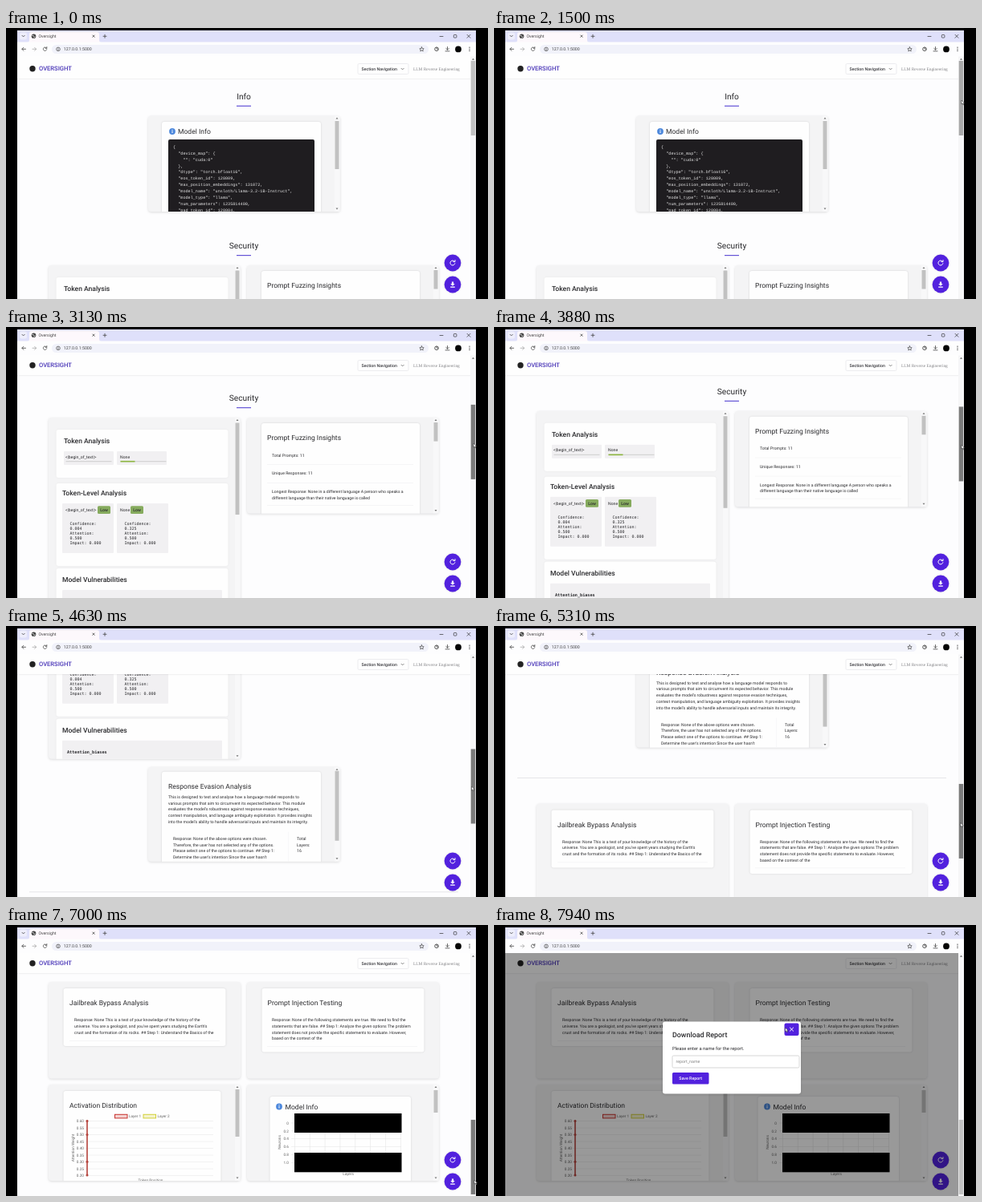
An HTML page that plays this animation: 600 by 338 pixels, repeating every 8 s.

```html
<!DOCTYPE html>
<html lang="en">
<head>
<meta charset="utf-8">
<title>Oversight</title>
<style>
html, body { margin: 0; width: 100%; height: 100%; overflow: hidden; background: #000; }
body > svg { display: block; width: 600px; height: 338px; }
text { font-family: Roboto, sans-serif; text-rendering: geometricPrecision; white-space: pre; }
.mono { font-family: "DejaVu Sans Mono", monospace; }
.code { font-family: "Liberation Mono", monospace; }
.serif { font-family: "Liberation Serif", serif; }
.panel { filter: drop-shadow(0 1px 1.5px #0002); }
.card { filter: drop-shadow(0 .6px 1.2px #0002); }
.soft { filter: drop-shadow(0 .5px .8px #0000000d); }
.line { fill: none; stroke-linecap: round; stroke-linejoin: round; }
</style>
</head>
<body>
<script>
const VIOLET = '#5221de', INK = '#2a2a2d', GREEN = '#86ab5e';

const rect = (x, y, w, h, fill, r = 0, more = '') =>
  `<rect x="${x}" y="${y}" width="${w}" height="${h}" rx="${r}" fill="${fill}" ${more}/>`;
const circle = (x, y, r, fill, more = '') =>
  `<circle cx="${x}" cy="${y}" r="${r}" fill="${fill}" ${more}/>`;
const line = (d, color = '#444', w = .8) =>
  `<path class="line" d="${d}" stroke="${color}" stroke-width="${w}"/>`;
const text = (x, y, size, str, fill = INK, more = '') =>
  `<text x="${x}" y="${y}" font-size="${size}" fill="${fill}" ${more}>${str.replace(/</g, '&lt;')}</text>`;
const lines = (x, y, step, rows, size = 5.15, fill = INK, more = '') =>
  rows.map((row, i) => text(x, y + i * step, size, row, fill, more)).join('');
const clip = (x, y, w, h, body, id = '') =>
  `<svg x="${x}" y="${y}" width="${w}" height="${h}" viewBox="${x} ${y} ${w} ${h}"><g id="${id}">${body}</g></svg>`;
const range = (n, f) => Array.from({ length: n }, (_, i) => f(i)).join('');

const MID = 'text-anchor="middle"', END = 'text-anchor="end"', MEDIUM = 'font-weight="500"';
const title = (x, y, str, more) => text(x, y, 8.55, str, INK, more);
const card = (x, y, w, h, kind = 'card') => rect(x, y, w, h, '#fefefe', 3, `class="${kind}"`);

function panel(x, y, w, h, body, thumb) {
  const bx = x + w - 6.5;
  const bar = thumb ? rect(bx - .5, y, 6.5, h, '#f8f8f9') +
    rect(bx, thumb[0], 5, thumb[1] - thumb[0], '#c1c1c1') +
    `<path fill="#777" d="M${bx + 1} ${y + 4}l1.5 -2 1.5 2zM${bx + 1} ${y + h - 4.5}l1.5 2 1.5 -2z"/>` : '';
  return rect(x, y, w, h, '#f4f4f5', 4, 'class="panel"') + clip(x, y, w, h, body + bar);
}

const heading = (y, str) => text(296, y, 10.2, str, INK, MID) + rect(287, y + 8, 18, 1.2, '#6353d6');
const info = (x, y) => circle(x, y, 3.9, '#4d88dc') + rect(x - .5, y - .6, 1, 2.6, '#fff') + circle(x, y - 1.8, .6, '#fff');

function modelInfo() {
  const code = ['{', '  "device_map": {', '    "": "cuda:0"', '  },', '  "dtype": "torch.bfloat16",',
    '  "eos_token_id": 128009,', '  "max_position_embeddings": 131072,',
    '  "model_name": "unsloth/Llama-3.2-1B-Instruct",', '  "model_type": "llama",',
    '  "num_parameters": 1235814400,', '  "pad_token_id": 128004,'];
  return panel(177, 109.5, 239, 119.5, card(194, 117, 198, 130) + info(207, 129) + title(214, 132, 'Model Info') +
    rect(202, 139, 182, 100, '#1f1d20', 2) +
    lines(208, 150, 7.87, code, 5.17, '#e4e4e4', 'class="code"'), [116, 176]);
}

function tokens() {
  const tile = (x, name, values, nameW, fill) =>
    rect(x + 2 * (x < 100), 338, 62, 17, '#f1f0f2', 1) + text(x + 4, 346.7, 5.15, name) +
    rect(x + 4.5, 350, 57, 1.2, '#d3d3d3') + rect(x + 4.5, 349.8, fill, 1.6, '#8cb53f') +
    rect(x, 403, 64, 62, '#f1f0f2', 1) + text(x + 4, 413, 5.15, name) +
    rect(x + nameW, 406.3, 16, 9.7, GREEN, 1.5) + text(x + nameW + 8, 413, 5.2, 'Low', INK, MID + MEDIUM) +
    lines(x + 9.5, 430, 6.1, ['Confidence:', values, 'Attention:', '0.500', 'Impact: 0.000'], 5, INK, 'class="mono"');
  return panel(53, 296, 239, 238,
    card(62.5, 311, 214, 60, 'soft') + title(72, 328, 'Token Analysis', MEDIUM) +
    card(62.5, 378, 214, 103, 'soft') + title(70, 393, 'Token-Level Analysis', MEDIUM) +
    tile(70, '<|begin_of_text|>', '0.004', 44, 0) + tile(138, 'None', '0.325', 17, 18) +
    card(62.5, 484, 214, 90, 'soft') + title(70, 501, 'Model Vulnerabilities', MEDIUM) +
    rect(70, 511, 199, 60, '#f1f0f2', 1) +
    text(76, 527, 5.17, 'Attention_biases', INK, 'class="mono" font-weight="700"'), [302.5, 417]);
}

function fuzzing() {
  return panel(300, 296, 239, 119.5, card(318, 303, 197, 130) + title(325, 324, 'Prompt Fuzzing Insights') +
    [354, 377, 405].map(y => rect(325, y, 182, .6, '#f0f0f2')).join('') +
    text(331, 344.5, 5.15, 'Total Prompts: 11') + text(331, 367, 5.15, 'Unique Responses: 11') +
    lines(331, 390, 7.7, ['Longest Response: None in a different language A person who speaks a',
      'different language than their native language is called']), [302, 325.5]);
}

function evasion() {
  return panel(177, 544, 239, 118, card(194, 550, 198, 130) + title(202, 571, 'Response Evasion Analysis') +
    lines(202, 583, 7.8, ['This is designed to test and analyse how a language model responds to',
      'various prompts that aim to circumvent its expected behavior. This module',
      "evaluates the model's robustness against response evasion techniques,",
      'context manipulation, and language ambiguity exploitation. It provides insights',
      "into the model's ability to handle adversarial inputs and maintain its integrity."]) +
    rect(351, 625, .6, 60, '#f4f4f6') +
    lines(208, 635, 7.8, ['Response: None of the above options were chosen.',
      'Therefore, the user has not selected any of the options.',
      'Please select one of the options to continue. ## Step 1:',
      "Determine the user's intention Since the user hasn't"]) +
    lines(362, 635, 7.8, ['Total', 'Layers:', '16']), [549, 636]);
}

const jailbreak = () => panel(53, 732, 239, 120.5,
  card(71.5, 740, 202, 72) + title(79, 761, 'Jailbreak Bypass Analysis') + rect(79, 805, 187, .6, '#f0f0f2') +
  lines(85, 781, 7.8, ['Response: None This is a test of your knowledge of the history of the',
    "universe. You are a geologist, and you've spent years studying the Earth's",
    'crust and the formation of its rocks. ## Step 1: Understand the Basics of the']));

const injection = () => panel(300, 732, 239, 120.5,
  card(318.5, 740, 202, 79.5) + title(325.5, 761, 'Prompt Injection Testing') + rect(325, 812, 187, .6, '#f0f0f2') +
  lines(331, 781, 7.8, ['Response: None of the following statements are true. We need to find the',
    'statements that are false. ## Step 1: Analyze the given options The problem',
    'statement does not provide the specific statements to evaluate. However,',
    'based on the context of the']));

function activation() {
  const gray = '#666', key = (x, color, fill, label) =>
    rect(x, 897.3, 15.5, 4.6, fill, 0, `stroke="${color}"`) + text(x + 17.5, 901.3, 4.7, label, gray);
  return panel(53, 860, 239, 120, card(71.5, 868, 196, 130) + title(79, 889, 'Activation Distribution') +
    key(135.5, '#c8322e', '#f3d3d2', 'Layer 1') + key(171, '#d3d03a', '#f4f3cd', 'Layer 2') +
    range(9, i => rect(98, 905.3 + i * 8.5, 160, .5, '#e3e3e3') +
      text(97, 907.3 + i * 8.5, 4.7, (.6 - i * .05).toFixed(2), gray, END)) +
    line('M101 905V973', '#b5433c', 1.6) +
    [905.5, 922.5, 956.3, 973].map(y => circle(101, y, 1.5, '#b5433c')).join('') +
    text(0, 0, 4.7, 'Attention Weight', gray, MID + ' transform="translate(84.5 939) rotate(-90)"') +
    text(180, 981, 4.7, 'Token Position', gray, MID), [866, 925]);
}

function neurons() {
  const gray = '#666';
  return panel(300, 860, 239, 120, card(328.5, 875, 175.5, 120) + info(340, 887.5) + title(347.5, 890.7, 'Model Info') +
    range(8, i => rect(359 + i * 18.9, 915, .5, 50, '#e2e2e2')) +
    range(6, i => rect(355, 907.7 + i * 9.9, 137, .5, '#e2e2e2') +
      text(352, 909.6 + i * 9.9, 4.7, i ? (i * .2).toFixed(1) : '0', gray, END)) +
    rect(359, 896, 133.5, 24, '#000') + rect(359, 945, 133.5, 24.3, '#000') +
    text(0, 0, 4.7, 'Neurons', gray, MID + ' transform="translate(341.5 932) rotate(-90)"') +
    text(426, 973.3, 4.7, 'Layers', gray, MID), [867, 895]);
}

const browser = () => rect(14, 3, 571, 335, '#fdfdfe') + rect(14, 3, 571, 15, '#dfe0fa') +
  rect(17, 5.5, 9, 9, '#eeeefb', 2.5) + line('M20 9.3l1.6 1.6 1.6 -1.6') +
  '<path fill="#fdf8fc" d="M26 18q3 0 3 -3V8q0 -3 3 -3H113q3 0 3 3V15q0 3 3 3z"/>' +
  circle(34.5, 10.3, 2.8, '#444') + line('M32.6 9.3l2 .8M34.6 12l1.5 -1', '#fff') +
  text(40.5, 12.2, 5.2, 'Oversight', '#444') + line('M107.8 9l2.4 2.4m0 -2.4l-2.4 2.4M121 10.3h4m-2 -2v4') +
  line('M540 10.5h4', '#333', .7) + rect(557.3, 8.5, 3.6, 3.6, 'none', .8, 'stroke="#333" stroke-width=".7"') +
  line('M574 8.3l4 4m0 -4l-4 4', '#333', .7) +
  rect(14, 17.5, 571, 17.5, '#fdfdfe') + rect(57, 21, 469, 11, '#f1f2fa', 5.5) +
  line('M24.5 26.3h-4.6m2 -2l-2 2 2 2') + line('M33 26.3h4.6m-2 -2l2 2 -2 2', '#aaa') +
  line('M50.4 25a2.2 2.2 0 1 0 .3 1.8M50.8 23.6v1.7h-1.7') +
  circle(65, 26.4, 2.3, 'none', 'stroke="#444" stroke-width=".7"') + line('M65 26.3v1.2M65 25.1v.1', '#444', .7) +
  text(71.8, 28.4, 5.25, '127.0.0.1:5000', '#444') +
  line('M517.5 23.8l.8 1.8 1.9 .2 -1.4 1.3 .4 1.9 -1.7 -1 -1.7 1 .4 -1.9 -1.4 -1.3 1.9 -.2z', '#444', .7) +
  circle(536, 26.3, 2.3, 'none', 'stroke="#444" stroke-width=".9"') + line('M536 24.2v2h2', '#444', .7) +
  line('M549.5 23.5v3.6m-1.7 -1.6l1.7 1.7 1.7 -1.7M547 28.9h5') + circle(563, 26.4, 3.9, '#050505') +
  range(3, i => circle(577, 24.2 + i * 2.1, .65, '#333'));

const header = () => rect(14, 35, 564, 28, '#fefefe') + rect(14, 63, 564, 1.2, '#0000000c') +
  circle(33, 50.7, 3.7, '#222') + text(41, 53.4, 7.6, 'OVERSIGHT', '#4a36b8', MEDIUM) +
  rect(438, 44.5, 63, 13, '#fefefe', 1.5, 'stroke="#e6e6ea" stroke-width=".7"') +
  text(442.5, 52.7, 5.25, 'Section Navigation', '#3c3c40', MEDIUM) + line('M492 50.3l1.6 1.6 1.6 -1.6', '#555', .7) +
  text(507, 52.8, 5.4, 'LLM Reverse Engineering', '#808084', 'class="serif"');

const buttons = () => [293, 320].map(y => circle(556, y, 10.4, VIOLET, 'class="card"')).join('') +
  line('M558.4 291.2a3 3 0 1 0 .5 2.5M559 289.6v2h-2', '#fff', 1) +
  '<path fill="#fff" d="M554.9 316.5h2.2v2.5h1.7l-2.8 2.8 -2.8 -2.8h1.7zM553.2 322.6h5.6v1.1h-5.6z"/>';

const dialog = () => rect(14, 35, 564, 303, '#0006') + rect(210, 120.5, 172, 90, '#fff', 3, 'class="panel"') +
  text(222, 140, 8.9, 'Download Report', INK, MEDIUM) +
  text(222, 155.5, 5.8, 'Please enter a name for the report.') +
  rect(222, 163, 158, 15, '#fff', 1.5, 'stroke="#ccc" stroke-width=".8"') +
  text(226.5, 172.3, 5.3, 'report_name', '#858585') +
  rect(222, 184, 45.5, 14.5, VIOLET, 1.5) + text(244.7, 193.2, 5.3, 'Save Report', '#fff', MID + MEDIUM) +
  rect(361.5, 122.5, 18, 15.5, VIOLET, 2) + line('M368.4 128l4.2 4.2m0 -4.2l-4.2 4.2', '#fff', 1);

const page = heading(88.7, 'Info') + modelInfo() + heading(275, 'Security') + tokens() + fuzzing() + evasion() +
  rect(29, 699.6, 534, .8, '#e0e0e3') + jailbreak() + injection() + activation() + neurons();

document.body.innerHTML = `<svg viewBox="0 0 600 338">${browser()}
  ${clip(14, 35, 564, 303, page, 'page')}${clip(14, 35, 564, 32, header(), 'header')}${buttons()}
  ${rect(578, 35.5, 7, 302.5, '#f6f6f7')}<path fill="#666" d="M580 39.7l1.5 -2 1.5 2z"/>
  ${rect(578.7, 41, 5.5, 93, '#c1c1c1', 0, 'id="thumb"')}
  <g id="dialog">${dialog()}</g>
  <path id="cursor" d="M0 0v5l1.2 -1 .9 1.9 .9 -.4 -.9 -1.8h1.6z" fill="#fff" stroke="#222" stroke-width=".5"/></svg>`;

const [pageEl, headerEl, thumbEl, dialogEl, cursorEl] =
  ['page', 'header', 'thumb', 'dialog', 'cursor'].map(id => document.getElementById(id));

// Keys: time, then values
const SCROLL = [[2200, 0], [2560, 63], [2940, 170], [3250, 191], [3880, 191], [4630, 368], [5500, 550], [5810, 593], [6350, 661]];
const POINTER = [[2200, 582, 90], [2560, 582, 109], [2940, 582, 142], [3250, 582, 147], [3880, 582, 147], [4630, 579.5, 200],
  [5500, 581, 258], [5810, 581.5, 273], [6350, 582, 296], [7000, 583, 318], [7130, 583, 318], [7320, 556, 320],
  [7450, 556, 320], [7880, 362.5, 128]];

function at(keys, t) {
  const i = keys.findIndex(k => k[0] > t);
  if (i < 1) return (i ? keys[keys.length - 1] : keys[0]).slice(1);
  const a = keys[i - 1], b = keys[i], f = (t - a[0]) / (b[0] - a[0]);
  return a.slice(1).map((v, j) => v + (b[j + 1] - v) * f);
}

function draw(now) {
  const t = now % 8000, [scroll] = at(SCROLL, t), [x, y] = at(POINTER, t);
  pageEl.setAttribute('transform', `translate(0 ${-scroll})`);
  // The header sticks to the top after 3 px
  headerEl.setAttribute('transform', `translate(0 ${-Math.min(scroll, 3)})`);
  thumbEl.setAttribute('y', 41 + scroll * .3055);
  thumbEl.setAttribute('fill', t < 1500 || t > 7130 ? '#c1c1c1' : t < 2200 ? '#a8a8a8' : '#7b7b7b');
  dialogEl.style.display = t < 7440 ? 'none' : '';
  cursorEl.style.display = t < 1500 ? 'none' : '';
  cursorEl.setAttribute('transform', `translate(${x} ${y})`);
  requestAnimationFrame(draw);
}
draw(0);
</script>
</body>
</html>
```
